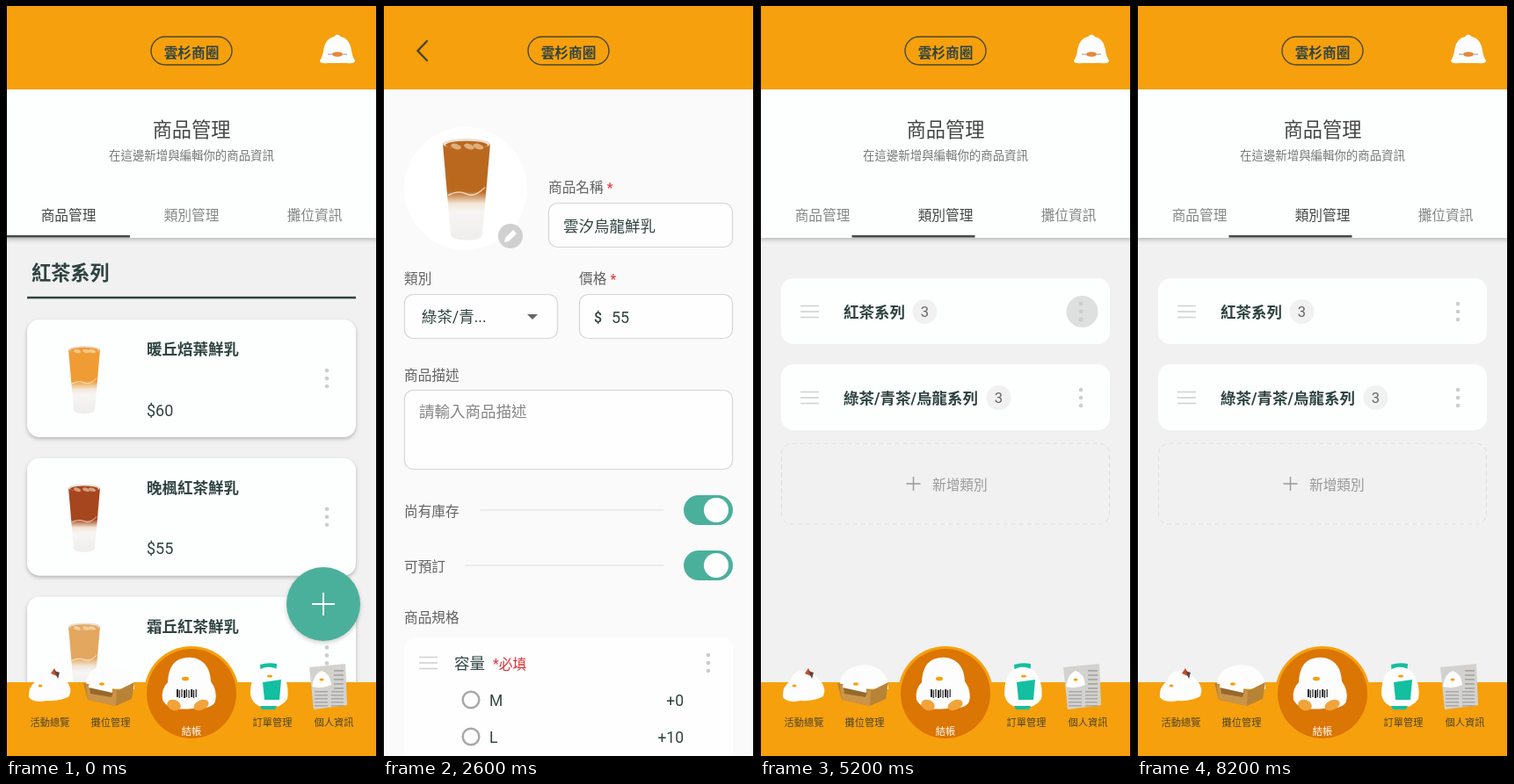
An HTML page with a canvas that plays this animation: 422x854 px, repeating every 8.47 s.

```html
<!DOCTYPE html>
<html lang="zh-Hant">
<head>
<meta charset="utf-8">
<style>
html, body { margin: 0; width: 100%; height: 100%; overflow: hidden; background: #000; }
canvas { display: block; width: 422px; height: 854px; }
</style>
</head>
<body>
<canvas id="stage" width="422" height="854"></canvas>
<script>
const W = 422, H = 854, LOOP = 8470, STEP = 1000 / 15;
const ORANGE = '#f6a00d', INK = '#2f4341', GREY = '#838786', TEAL = '#4bb09b', RED = '#dd3338';
const FONT = 'Roboto, "Noto Sans CJK TC", "Noto Sans CJK", sans-serif';
const GREEN_TEA = '綠茶/青茶/烏龍系列', RED_TEA = '紅茶系列', OOLONG = '雲汐烏龍鮮乳';

const stage = document.getElementById('stage').getContext('2d');
const layer = Object.assign(document.createElement('canvas'), { width: W, height: H });
let g = stage;

const clamp = v => Math.max(0, Math.min(1, v));
const ramp = (t, a, b) => clamp((t - a) / (b - a));
const smooth = u => u * u * (3 - 2 * u);
const easeOut = u => 1 - (1 - u) ** 3;
const ease = (t, a, b) => smooth(ramp(t, a, b));

function text(s, x, cy, size, color = INK, weight = 400, align = 'left') {
  g.font = `${weight} ${size}px ${FONT}`;
  g.textAlign = align;
  g.fillStyle = color;
  g.fillText(s, x, cy + size * 0.37);
}
function rect(x, y, w, h, color) {
  g.fillStyle = color;
  g.fillRect(x, y, w, h);
}
function box(x, y, w, h, r, fill, stroke, lw = 1.2) {
  g.beginPath();
  g.roundRect(x, y, w, h, r);
  paint(fill, stroke, lw);
}
function paint(fill, stroke, lw = 1) {
  if (fill) { g.fillStyle = fill; g.fill(); }
  if (stroke) { g.strokeStyle = stroke; g.lineWidth = lw; g.stroke(); }
}
function disc(x, y, r, fill, stroke, lw) {
  g.beginPath();
  g.arc(x, y, Math.max(0, r), 0, 7);
  paint(fill, stroke, lw);
}
function oval(x, y, rx, ry, fill, turn = 0) {
  g.beginPath();
  g.ellipse(x, y, rx, ry, turn, 0, 7);
  paint(fill);
}
function shape(d, fill, stroke, lw) {
  const p = new Path2D(d);
  if (fill) { g.fillStyle = fill; g.fill(p); }
  if (stroke) { g.strokeStyle = stroke; g.lineWidth = lw; g.stroke(p); }
}
function scoped(draw) {
  g.save();
  draw();
  g.restore();
}
function clipTo(x, y, w, h) {
  g.beginPath();
  g.rect(x, y, w, h);
  g.clip();
}
function withShadow(blur, dy, alpha, draw) {
  scoped(() => {
    g.shadowColor = `rgba(0,0,0,${alpha})`;
    g.shadowBlur = blur;
    g.shadowOffsetY = dy;
    draw();
  });
}
function dots(x, cy) {
  for (const d of [-9, 0, 9]) disc(x, cy + d, 2.3, '#cdcdcd');
}
function burger(x, cy) {
  for (const d of [-6.5, 0, 6.5]) rect(x, cy + d - 0.8, 21, 1.6, '#d2d2d2');
}
function plus(x, y, r, color, lw) {
  shape(`M${x - r} ${y}H${x + r}M${x} ${y - r}V${y + r}`, null, color, lw);
}

function cup(cx, top, k, tea) {
  scoped(() => {
    g.translate(cx, top);
    g.scale(k, k);
    const fill = g.createLinearGradient(0, 0, 0, 77);
    fill.addColorStop(0, tea);
    fill.addColorStop(0.52, tea);
    fill.addColorStop(0.64, '#f3e6d6');
    fill.addColorStop(0.72, '#f6f5f3');
    fill.addColorStop(1, '#efeeec');
    shape('M-18 4L-12 73Q-11 77 0 77Q11 77 12 73L18 4Z', fill);
    oval(0, 4, 18, 4, '#eadfd2');
    oval(0, 5, 16, 3.2, tea);
    for (const x of [-8, 2, 9]) oval(x, 6, 4, 2, 'rgba(255,245,220,.5)', 0.3);
    shape('M-14 43Q-6 39 0 42T14 37', null, 'rgba(255,255,255,.65)', 1);
  });
}

function header() {
  rect(0, 0, W, 95, ORANGE);
  box(165, 35, 92, 32, 16, null, '#4b4a2e', 1.4);
  text('雲杉商圈', 211, 53, 15.7, INK, 700, 'center');
}
function avatar() {
  shape('M357 62Q360 58 361 51Q363 37 373 35Q377 30 381 35Q391 37 393 51Q394 58 397 62Q397 66 388 65H366Q357 66 357 62Z', '#fdfdfd');
  oval(377, 55, 6, 2.7, '#e8853a');
  shape('M366 55H371M383 55H388', null, '#999', 1);
}

function titleBlock(tab) {
  withShadow(5, 2, 0.25, () => rect(0, 95, W, 169, '#fdfefe'));
  text('商品管理', 211, 141, 22.2, '#454545', 400, 'center');
  text('在這邊新增與編輯你的商品資訊', 211, 170, 13.43, '#777', 400, 'center');
  ['商品管理', '類別管理', '攤位資訊'].forEach((s, i) =>
    text(s, 71 + i * 140, 238, 15.7, i === Math.round(tab) ? '#444' : GREY, 400, 'center'));
  rect(1 + 103.5 * tab, 261, 140, 2.6, '#45494a');
}

const groups = [
  { name: RED_TEA, y: 304, line: 332, first: 357, items: [
    ['暖丘焙葉鮮乳', 60, '#ef9c35'], ['晚楓紅茶鮮乳', 55, '#a6461f'], ['霜丘紅茶鮮乳', 55, '#e3a75f']] },
  { name: GREEN_TEA, y: 848, line: 876, first: 901.5, items: [
    ['青嵐晨葉鮮乳', 55, '#e0a033'], [OOLONG, 55, '#bb681f'], ['綠庭風鮮乳', 55, '#e8bd45']] }
];

function productList(scroll) {
  scoped(() => {
    g.translate(0, -scroll);
    for (const group of groups) {
      text(group.name, 29, group.y, 22.2, INK, 700);
      rect(24, group.line - 1.2, 374, 2.5, INK);
      group.items.forEach(([name, price, tea], i) => {
        const y = group.first + i * 157.7;
        withShadow(4, 2, 0.25, () => box(24, y, 374, 134, 14, '#fdfefe'));
        cup(89, y + 30, 1, tea);
        text(name, 160, y + 34, 17.5, INK, 700);
        text('$' + price, 160, y + 103, 18, INK);
        dots(365, y + 67);
      });
    }
  });
}

function categoryCard(name, badgeX, y, lifted) {
  withShadow(lifted ? 8 : 0, lifted ? 3 : 0, lifted ? 0.2 : 0, () => box(24, y, 374, 75, 14, '#fdfefe'));
  burger(46, y + 38);
  text(name, 95, y + 38.5, 17.5, INK, 700);
  disc(badgeX, y + 38, 14, '#f1f1f1');
  text('3', badgeX, y + 38, 16.5, '#666', 400, 'center');
  dots(365, y + 38);
}

// The upper card is pulled past the lower slot and settles while the other moves up.
function categories(t) {
  const second = t >= 7640;
  const u = second ? ramp(t, 7667, 8200) : ramp(t, 6933, 7533);
  const pulled = u < 0.7 ? 116 * smooth(u / 0.7) : 116 - 18 * ease(u, 0.7, 1);
  const upper = 310 + pulled, lower = 408 - 98 * ease(u, 0.3, 0.6);
  const red = y => categoryCard(RED_TEA, 187.5, y, !second && u > 0 && u < 1);
  const green = y => categoryCard(GREEN_TEA, 271.5, y, second && u > 0 && u < 1);
  scoped(() => {
    g.setLineDash([5, 4]);
    box(24.5, 498, 373, 92, 12, null, '#dedede', 1);
  });
  plus(174.5, 544, 8, '#999', 1.4);
  text('新增類別', 196, 545, 15.7, '#999');
  if (second) { red(lower); green(upper); }
  else { green(lower); red(upper); }
  if (t > 5190 && t < 5400) {
    disc(366.5, 348, 18, 'rgba(0,0,0,.12)');
    dots(365, 348);
  }
}

function navBar() {
  rect(0, 770, W, 84, ORANGE);
  // resting bird
  shape('M26 787Q25 775 34 769Q37 757 49 757Q62 760 68 768Q76 776 72 786Q62 792 46 791Q31 794 26 787Z', '#fdfdfd');
  shape('M51 760L55 754L60 764Z', '#c94c2e');
  shape('M55 757L61 759L59 766Z', '#5c4740');
  oval(39, 774, 2.5, 1.6, ORANGE);
  // bird in a carton
  shape('M91 777Q90 757 108 752Q126 747 138 757Q147 765 146 778Z', '#fdfdfd');
  shape('M88 771L128 779L146 770L143 789L125 797L93 790Z', '#b98335');
  shape('M91 773L126 780L125 797L93 790Z', '#cb9447');
  shape('M95 775L122 781L120 787L96 783Z', '#96692c');
  shape('M94 776Q94 766 108 765Q122 766 121 782Z', '#fdfdfd');
  oval(109, 772, 3, 1.7, ORANGE);
  // checkout button
  disc(211, 783, 54, ORANGE);
  disc(211, 783, 51, '#db7504');
  shape('M178 790Q176 778 184 770Q185 747 200 743Q211 740 219 744Q232 750 233 769Q241 780 238 792Q234 801 212 800Q184 803 178 790Z', '#fdfdfd');
  oval(204, 766, 4, 2.3, ORANGE);
  for (let i = 0; i < 9; i++) rect(194 + i * 2.7, 778 + i % 2, i % 3 ? 1.2 : 2, 9, '#222');
  oval(191, 796, 8, 6, '#f2a33a', 0.4);
  oval(222, 796, 9, 5.5, '#f2a33a', -0.4);
  // bird with an order book
  shape('M289 750Q298 747 308 749L307 760H290Z', '#13bfa0');
  shape('M278 784Q278 766 285 758Q298 748 312 757Q323 771 320 789Q314 799 299 799Q281 799 278 784Z', '#fdfdfd');
  shape('M292 770L313 767L311 790L294 790Z', '#13bfa0');
  shape('M289 797H308L306 801H291Z', '#13bfa0');
  oval(300, 763, 3, 1.6, ORANGE);
  // newspaper
  shape('M345 753L386 749L388 796L350 801Z', '#d3d2cf');
  for (let i = 0; i < 5; i++) {
    rect(373, 756 + i * 5, 11, 1.8, '#a9a8a6');
    rect(351, 780 + i * 4, 15, 1.5, '#a9a8a6');
    rect(370, 780 + i * 4, 14, 1.5, '#a9a8a6');
  }
  shape('M348 775Q350 760 359 757Q369 760 370 773Q360 778 348 775Z', '#fdfdfd');
  oval(359, 767, 2.5, 1.5, ORANGE);
  ['活動總覽', '攤位管理', null, '訂單管理', '個人資訊'].forEach((s, i) => {
    if (s) text(s, [50, 119, 0, 303, 373][i], 816, 11.2, '#4d4527', 400, 'center');
  });
  text('結帳', 211, 826, 11.2, '#fff', 400, 'center');
}

function addButton(k) {
  if (k <= 0) return;
  withShadow(5, 2, 0.2, () => disc(361, 681, 42 * k, TEAL));
  plus(361, 681, 13 * k, '#fff', 2);
}

function pencil(x, y, color) {
  scoped(() => {
    g.translate(x, y);
    g.lineJoin = g.lineCap = 'round';
    shape('M-1 -9H-8Q-11 -9 -11 -6V8Q-11 11 -8 11H6Q9 11 9 8V2M-5 5L-4 -1L7 -12Q9 -13 11 -11Q13 -9 11 -7L1 4Z', null, color, 2);
  });
}
function trash(x, y, color) {
  scoped(() => {
    g.translate(x, y);
    g.lineJoin = g.lineCap = 'round';
    shape('M-10 -7H10M-5 -7V-10Q-5 -12 -3 -12H3Q5 -12 5 -10V-7M-8 -7V9Q-8 12 -5 12H5Q8 12 8 9V-7M-3 -2V7M3 -2V7', null, color, 2);
  });
}

function sheet(p, top, drawHead, press) {
  if (p <= 0) return;
  rect(0, 7, W, H - 7, `rgba(0,0,0,${0.1 * p})`);
  scoped(() => {
    g.translate(0, (1 - p) * (H - top));
    box(1, top, 420, H - top + 20, [18, 18, 0, 0], '#fefefe');
    box(195, top + 12, 32, 5, 2.5, '#3d3d40');
    drawHead();
    rect(1, 706, 420, 1, '#ececec');
    if (press > 0) scoped(() => {
      clipTo(1, 706, 420, 57);
      disc(174, 735, press, '#e1e1e1');
    });
    pencil(47, 736, '#3f4446');
    text('編輯', 85, 737.5, 15.7);
    trash(47, 792, RED);
    text('刪除', 85, 793.5, 15.7, RED);
  });
}
function productHead() {
  cup(61, 614, 0.8, '#bb681f');
  text(OOLONG, 122, 633, 17.5);
  text(GREEN_TEA + ' · $55', 122, 663, 15.7, '#a09b99');
}
function categoryHead() {
  text(RED_TEA, 34, 643, 22.2, INK, 700);
  text('共3樣商品在此類別', 34, 672, 15.7, '#a09b99');
}

function field(x, y, w, h) {
  box(x + 0.5, y + 0.5, w - 1, h - 1, 10, '#fefefe', '#d6d6d6');
}
function label(s, x, cy, required) {
  text(s, x, cy, 15.7, '#626262');
  if (required) text('*', x + s.length * 15.7 + 4, cy + 1, 15.7, RED);
}
function toggleRow(s, cy, lineX) {
  label(s, 24, cy + 1);
  rect(lineX, cy - 0.5, 319 - lineX, 1, '#e2e2e2');
  box(342, cy - 17, 56, 34, 17, TEAL);
  disc(379, cy, 14, '#fefefe');
}
function option(s, extra, cy) {
  disc(100, cy - 1, 9.3, null, '#a8a8a8', 2.5);
  text(s, 121, cy, 17.5);
  text(extra, 342, cy, 17.5, INK, 400, 'right');
}
function specHead(s, cy) {
  burger(41, cy - 1);
  text(s, 81, cy, 17.5);
  text('*必填', 125, cy, 15.7, RED);
  dots(370, cy - 1);
}

function editPage(t) {
  rect(0, 0, W, H, '#fafafa');
  scoped(() => {
    clipTo(0, 95, W, H);
    g.translate(0, 100 * (1 - ease(t, 2733, 3133)));
    disc(94, 108, 70, '#fff');
    cup(95, 51, 1.5, '#bb681f');
    disc(145, 162, 14, '#d0d0d0');
    shape('M138 169L139 164L148 155L152 159L143 168Z', '#fff');
    label('商品名稱', 188, 106, true);
    field(188, 124, 210, 51);
    text(OOLONG, 205, 150.5, 17.5);
    label('類別', 24, 210);
    field(24, 228, 175, 51);
    text('綠茶/青...', 44, 254, 17.5);
    shape('M164 251H176L170 257Z', '#666');
    label('價格', 223, 210, true);
    field(223, 228, 175, 51);
    text('$', 240, 254, 16, INK, 500);
    text('55', 260, 254, 18);
    label('商品描述', 24, 320);
    field(24, 337, 374, 91);
    text('請輸入商品描述', 41, 362, 17.5, '#858585');
    toggleRow('尚有庫存', 474, 110);
    toggleRow('可預訂', 537, 93);
    label('商品規格', 24, 596);
    box(24, 619, 374, 300, 12, '#fefefe');
    specHead('容量', 649);
    option('M', '+0', 691);
    option('L', '+10', 733);
    rect(24, 760, 374, 1, '#e2e2e2');
    specHead('甜度', 791);
    option('正常', '+0', 833);
  });
  const bar = t > 2720 ? 1 - ramp(t, 3200, 3333) : 0;
  rect(416, 170 - 40 * (1 - ease(t, 2733, 3133)), 5, 301, `rgba(120,120,120,${0.65 * bar})`);
  header();
  if (t > 3460) disc(45, 50, 28.5, 'rgba(90,70,40,.18)');
  g.lineCap = 'round';
  shape('M50 40L39.5 51L50 62', null, '#4a4526', 2.4);
}

function mainPage(t) {
  const tab = easeOut(ramp(t, 4200, 4467));
  const scroll = 698 * smooth(ramp(t, 0, 1083));
  rect(0, 0, W, H, '#f1f1f1');
  scoped(() => {
    clipTo(0, 264, W, H);
    g.translate(-W * tab, 0);
    if (tab < 1) productList(scroll);
    if (t > 1120 && t < 1550) disc(365, 428, 18 * ramp(t, 1067, 1200), 'rgba(0,0,0,.08)');
    const bar = t > 60 ? 1 - ramp(t, 1133, 1400) : 0;
    rect(416, 354 + (scroll - 527) * 0.437, 5, 332, `rgba(120,120,120,${0.65 * bar})`);
    g.translate(W, 0);
    if (tab > 0) categories(t);
  });
  titleBlock(tab);
  header();
  avatar();
  navBar();
  addButton(1 - tab);

  const product = t < 3000 ? easeOut(ramp(t, 1200, 1600)) : 1 - ease(t, 3933, 4133);
  const press = t > 1930 && t < 3000 ? 157 + (t - 1933) * 0.9 : 0;
  sheet(product, 556, productHead, press);
  const category = t < 6000
    ? easeOut(ramp(t, 5200, 5467)) - ease(t, 5667, 5933)
    : easeOut(ramp(t, 6200, 6400)) - ease(t, 6533, 6800);
  sheet(category, 574.5, categoryHead, 0);
}

function draw(ms) {
  const t = Math.floor((ms % LOOP + 5) / STEP) * STEP;
  const page = ease(t, 2133, 2467) - ease(t, 3467, 3667);
  g = stage;
  if (page < 1) mainPage(t);
  if (page > 0) {
    g = layer.getContext('2d');
    scoped(() => editPage(t));
    g = stage;
    g.globalAlpha = page;
    g.drawImage(layer, 0, 0);
    g.globalAlpha = 1;
  }
  rect(0, 0, 1, H, '#000');
  rect(421, 0, 1, H, '#000');
}

let start;
function frame(now) {
  start ??= now;
  draw(Math.max(0, now - start));
  requestAnimationFrame(frame);
}
draw(0);
requestAnimationFrame(frame);
</script>
</body>
</html>
```
